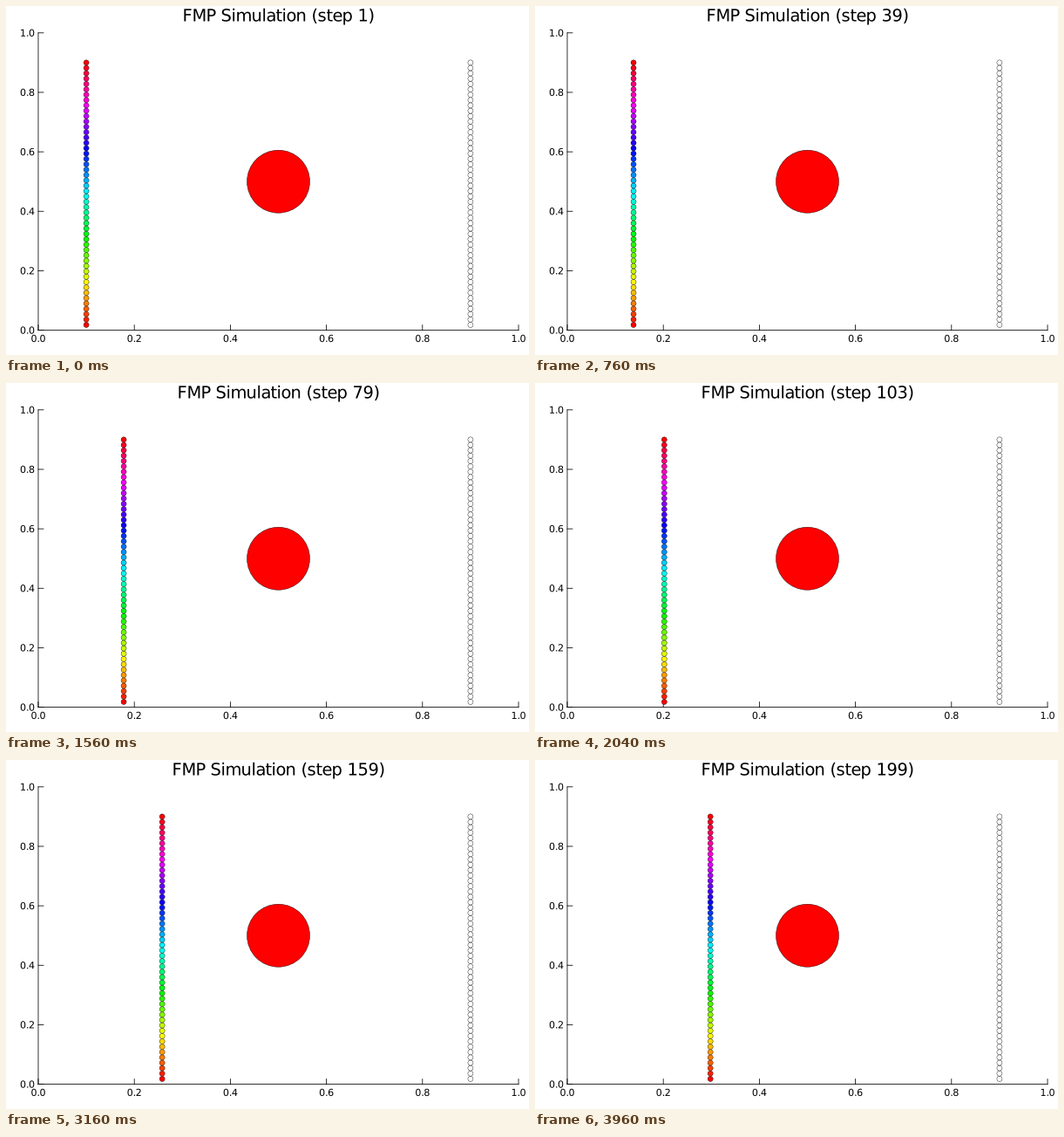
Animation of 600x400 px, one loop 4000 ms. Source, as a matplotlib script:

```python
import colorsys
import math

import matplotlib.pyplot as plt
import numpy as np
from matplotlib.animation import FuncAnimation
from matplotlib.collections import EllipseCollection
from matplotlib.patches import PathPatch
from matplotlib.path import Path
from matplotlib.textpath import TextPath

W, H, DPI = 600, 400, 100
FRAMES, INTERVAL = 100, 40
COUNT = 50
LEFT, RIGHT, BOTTOM, TOP = 37, 588, 28.4, 369.2
PX = 72 / DPI
TICK_SIZE, TITLE_SIZE = 8 / PX, 14 / PX

plt.rcParams["font.family"] = "DejaVu Sans"


def to_x(v):
    return LEFT + (RIGHT - LEFT) * v


def to_y(v):
    return BOTTOM + (TOP - BOTTOM) * v


fig = plt.figure(figsize=(W / DPI, H / DPI), dpi=DPI, facecolor="white")
ax = fig.add_axes([0, 0, 1, 1])
ax.set_xlim(0, W)
ax.set_ylim(0, H)
ax.axis("off")


def line(xs, ys):
    ax.plot(xs, ys, color="black", lw=0.8 * PX, solid_capstyle="projecting",
            snap=False)


def ink_width(text, size):
    return TextPath((0, 0), text, size=size).get_extents().width


def advance(char, size):
    """Glyph advance, cut to whole pixels."""
    return math.floor(ink_width(f"|{char}|", size) - ink_width("||", size))


def text_path(x, y, text, size, align):
    """Outline of text; align is the share of its width left of x."""
    steps = [advance(c, size) for c in text]
    pen = x - align * sum(steps)
    glyphs = []
    for char, step in zip(text, steps):
        if char != " ":
            glyphs.append(TextPath((pen, y), char, size=size))
        pen += step
    return Path.make_compound_path(*glyphs)


def label(*args):
    patch = PathPatch(text_path(*args), facecolor="black", lw=0, snap=False)
    return ax.add_patch(patch)


def discs(x, heights, radius, colors):
    """Circles with a thin dark outline, radius in pixels."""
    size = np.full(len(heights), 2 * radius)
    group = EllipseCollection(size, size, np.zeros(len(heights)), units="xy",
                              offsets=column(x, heights),
                              offset_transform=ax.transData,
                              facecolors=colors, edgecolors="black",
                              linewidths=0.4 * PX, snap=False, zorder=3)
    return ax.add_collection(group, autolim=False)


def column(x, heights):
    return np.column_stack([np.full(len(heights), x), heights])


def title_path(step):
    return text_path(to_x(0.5), H - 17.5, f"FMP Simulation (step {step})",
                     TITLE_SIZE, 0.5)


# Axes with inward ticks
line([LEFT, LEFT], [TOP, BOTTOM])
line([LEFT, RIGHT], [BOTTOM, BOTTOM])
for k in range(6):
    v = k / 5
    x, y = to_x(v), to_y(v)
    line([x, x], [BOTTOM, BOTTOM + 6])
    line([LEFT, LEFT + 6], [y, y])
    label(x, H - 385, f"{v:.1f}", TICK_SIZE, 0.5)
    label(33, y - 4, f"{v:.1f}", TICK_SIZE, 1)

rows = to_y(0.9 * np.arange(1, COUNT + 1) / COUNT)
rainbow = [colorsys.hsv_to_rgb(i / (COUNT - 1), 1, 1) for i in range(COUNT)]

# A plain patch keeps the big disc off the pixel grid
ax.add_patch(plt.Circle((to_x(0.5), to_y(0.5)), 36, facecolor="red",
                        edgecolor="black", lw=0.4 * PX, snap=False))
discs(to_x(0.9), rows, 3, ["white"] * COUNT)
movers = discs(to_x(0.1), rows, 3, rainbow)
title = ax.add_patch(PathPatch(title_path(1), facecolor="black", lw=0,
                               snap=False))


def update(i):
    step = 1 + 2 * i
    movers.set_offsets(column(to_x(0.1 + 0.001 * (step - 1)), rows))
    title.set_path(title_path(step))
    return movers, title


anim = FuncAnimation(fig, update, frames=FRAMES, interval=INTERVAL,
                     repeat=True, repeat_delay=0, blit=False)
plt.show()
```
